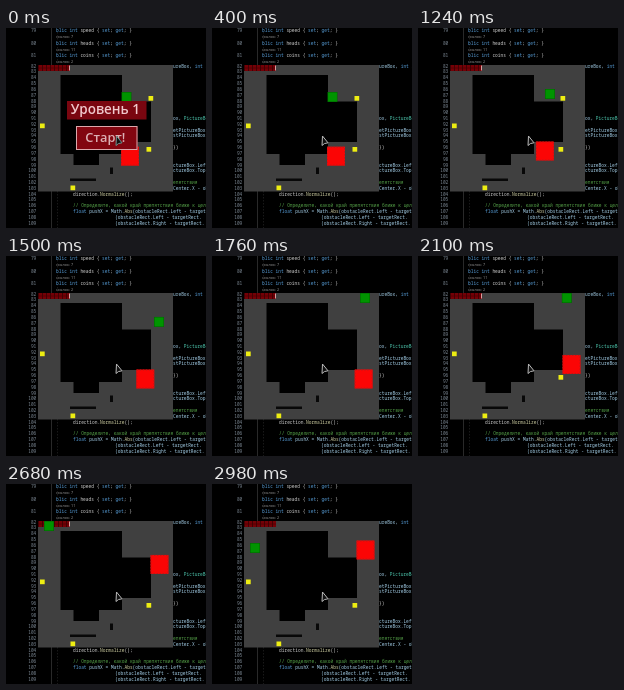
These frames come from a looping animation (200x200 px, 3 s). An HTML page with a canvas:

```html
<!DOCTYPE html>
<html lang="ru">
<head>
<meta charset="utf-8">
<style>
html, body { margin: 0; width: 100%; height: 100%; overflow: hidden; background: #000; }
canvas { display: block; width: 100vw; height: 100vh; }
</style>
</head>
<body>
<canvas id="stage" width="200" height="200"></canvas>
<script>
const ctx = document.getElementById('stage').getContext('2d');
const LOOP = 3000, MENU_END = 200, COIN_TAKEN = 1320, LINE = 5.82;
const BLUE = '#569cd6', PLAIN = '#d0d0d0', GREEN = '#57a64a', YELLOW = '#d0d0a4',
  TYPE = '#4ec9b0', LOCAL = '#a4cfe8', GREY = '#999';
const SANS = '"Open Sans", "Noto Sans", sans-serif';
const COINS = [[142.5, 68], [34, 95.5], [140.5, 119], [64.5, 157.5]];

// Lines 79 to 81 are taller: each has a reference count below it
const row = n => n < 82 ? 3.2 + (n - 79) * 12.3 : 38.3 + (n - 82) * LINE;

// Distance covered at time t by a steady move between two times
const slide = (t, from, to, distance) =>
  distance * Math.min(1, Math.max(0, (t - from) / (to - from)));

const playerAt = t => [
  115.5 + slide(t, 1100, 1500, 32.5) - slide(t, 2080, 2630, 110),
  64 - slide(t, 400, 600, 3) - slide(t, 1500, 1760, 24) + slide(t, 2720, 2980, 22)
];

const enemyAt = t => [
  115 + slide(t, 1180, 1800, 29.5),
  118.7 - slide(t, 400, 700, 5.2) - slide(t, 1800, 2980, 57)
];

function rect(color, x, y, w, h) {
  ctx.fillStyle = color;
  ctx.fillRect(x, y, w, h);
}

function frameBox(color, x, y, w, h, dash = []) {
  ctx.strokeStyle = color;
  ctx.lineWidth = 1;
  ctx.setLineDash(dash);
  ctx.strokeRect(x + .5, y + .5, w - 1, h - 1);
  ctx.setLineDash([]);
}

// Draws [text, colour] runs one after another
function code(x, n, ...runs) {
  for (const [text, color] of runs) {
    ctx.fillStyle = color;
    ctx.fillText(text, x, row(n));
    x += ctx.measureText(text).width;
  }
}

function editor() {
  rect('#000', 0, 0, 200, 200);
  rect('#292929', 45, 0, 1, 200);
  for (let y = 1; y < 200; y += 3) rect('#333', 51, y, .5, 1.5);

  ctx.textBaseline = 'middle';
  ctx.font = '4.53px "Noto Sans Mono", "DejaVu Sans Mono", monospace';
  ctx.textAlign = 'right';
  for (let n = 79; n <= 109; n++) code(30.3, n, [String(n), '#7c8894']);
  ctx.textAlign = 'left';

  ['speed', 'heads', 'coins'].forEach((name, i) => code(50, 79 + i,
    ['blic int ', BLUE], [name, PLAIN], [' { ', PLAIN], ['set', BLUE], ['; ', PLAIN], ['get', BLUE], ['; }', PLAIN]));

  code(167, 82, ['ureBox, ', LOCAL], ['int', BLUE], [' speed', LOCAL]);
  code(167, 91, ['ox, ', LOCAL], ['PictureBox', TYPE]);
  code(167, 93, ['etPictureBox.L', LOCAL]);
  code(167, 94, ['stPictureBox.T', LOCAL]);
  code(167, 96, ['})', PLAIN]);
  code(167, 99, ['ctureBox.Left', LOCAL]);
  code(167, 100, ['ctureBox.Top -', LOCAL]);
  code(167, 102, ['епятствия', GREEN]);
  code(167, 103, ['Center.X - ob', LOCAL]);

  code(67, 104, ['direction.', PLAIN], ['Normalize', YELLOW], ['();', PLAIN]);
  code(67, 106, ['// Определите, какой край препятствия ближе к целевому', GREEN]);
  code(67, 107, ['float', BLUE], [' pushX = Math.', LOCAL], ['Abs', YELLOW], ['(obstacleRect.Left - targetRect', LOCAL]);
  code(109, 108, ['(obstacleRect.Left - targetRect.', LOCAL]);
  code(109, 109, ['(obstacleRect.Right - targetRect.', LOCAL]);

  ctx.font = '3.8px ' + SANS;
  ctx.fillStyle = GREY;
  [7, 11, 2].forEach((count, i) => ctx.fillText('ссылок: ' + count, 50, row(79 + i) + 6.2));
}

function healthBar(t) {
  rect('#740006', 32, 37, 32, 6);
  for (let x = 32; x < 64; x += 4) rect('#420003', x, 37, 1, 6);
  rect('#420003', 32, 39.7, 32, .6);
  if (t < 2720) rect('#d8a0a0', 63, 37.5, 1, 5);
}

function game(t) {
  const [px, py] = playerAt(t), [ex, ey] = enemyAt(t);
  rect('#404040', 32, 37, 135, 126.5);
  rect('#000', 54.5, 47, 61.5, 79);
  rect('#000', 116, 73.5, 29, 40.5);
  rect('#000', 67.5, 126, 25.5, 11);
  rect('#080808', 64, 150.5, 26, 2.5);
  rect('#080808', 104, 139.5, 3, 6.5);
  healthBar(t);

  COINS.forEach(([x, y], i) => {
    const covered = x + 5 > ex && x < ex + 18 && y + 5 > ey && y < ey + 19;
    const taken = i === 0 && t >= COIN_TAKEN;
    if (!covered && !taken) rect('#eeee12', x, y, 4.7, 4.7);
  });

  rect('#006a00', px, py, 10, 10);
  rect('#009400', px + .6, py + .6, 8.8, 8.8);

  rect('#fb0505', ex, ey, 18, 19);
  frameBox('#c01818', ex, ey, 18, 19, [1.5, 1.5]);
}

function label(text, y, size, color) {
  ctx.font = `600 ${size}px ${SANS}`;
  ctx.fillStyle = color;
  ctx.fillText(text, 99.3, y);
}

function menu() {
  rect('#7a0610', 61, 73, 79.5, 18.5);
  rect('#820610', 70, 98, 61.5, 24);
  frameBox('#dca8ac', 70, 98, 61.5, 24);
  ctx.textAlign = 'center';
  label('Уровень 1', 82.8, 13.5, '#f0c8cc');
  label('Старт!', 111, 12.8, '#dcb0b4');
  ctx.textAlign = 'left';
}

function cursor(color) {
  ctx.beginPath();
  ctx.moveTo(110.5, 108);
  ctx.lineTo(110, 117.5);
  ctx.lineTo(112.4, 115.6);
  ctx.lineTo(116, 114.8);
  ctx.closePath();
  ctx.fillStyle = '#111';
  ctx.fill();
  ctx.strokeStyle = color;
  ctx.lineWidth = 1;
  ctx.stroke();
}

function frame(now) {
  const t = now % LOOP, inMenu = t < MENU_END;
  editor();
  game(t);
  if (inMenu) menu();
  cursor(inMenu ? '#6f9490' : '#b8b8b8');
  requestAnimationFrame(frame);
}
requestAnimationFrame(frame);
</script>
</body>
</html>
```
